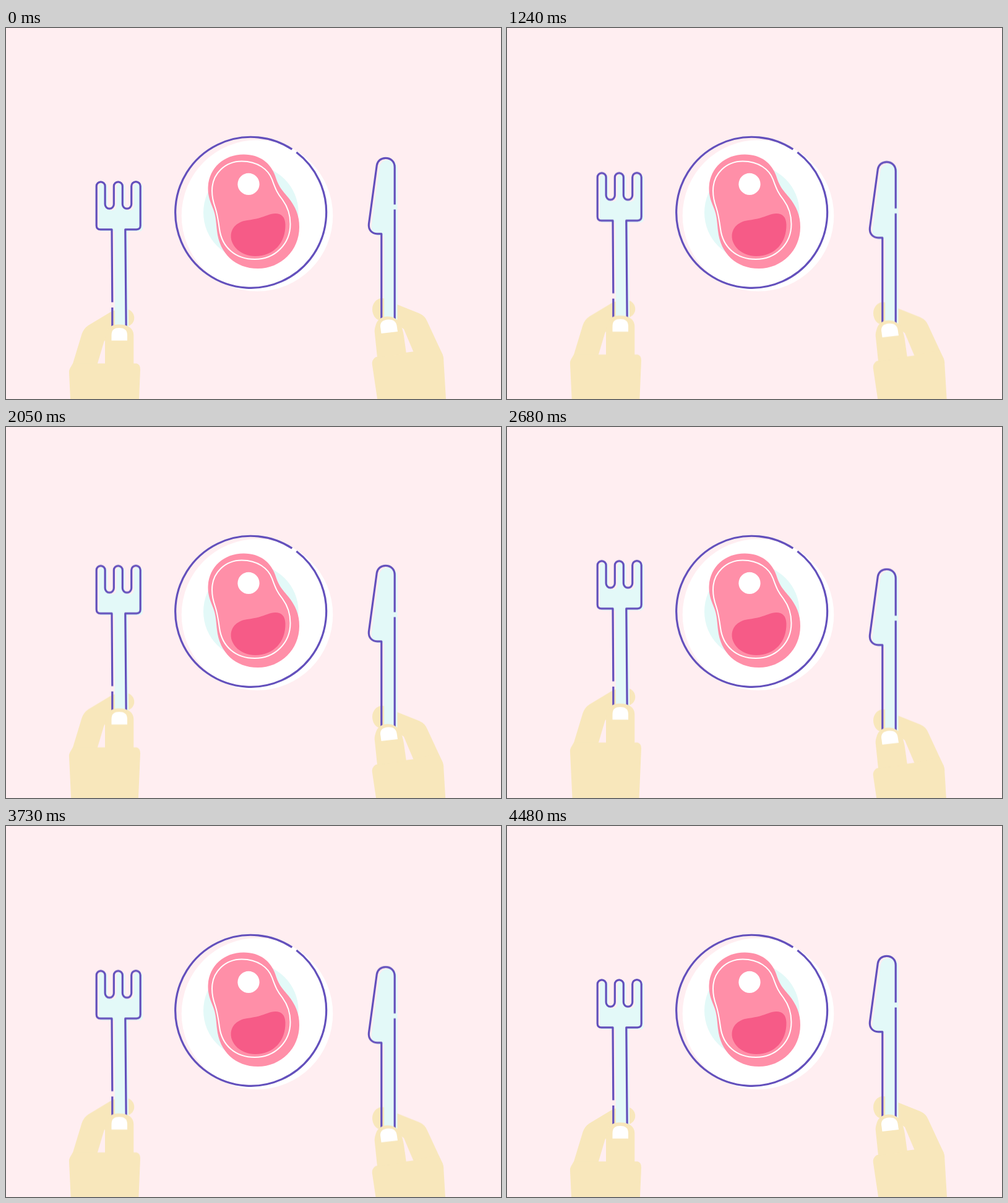
Recreate the animation shown at these times as an HTML page. Size 800 by 600 pixels, loop 4.51 s.

```html
<!DOCTYPE html>
<html lang="en">
<head>
<meta charset="utf-8">
<title>Dinner time</title>
<style>
  html, body { margin: 0; height: 100%; overflow: hidden; background: #ffeef1; }
  svg { display: block; width: 100%; height: 100%; }
  .line { fill: none; stroke: #6350bc; stroke-width: 3.2; stroke-linejoin: round; }
  .mint { fill: #e3f9f8; }
  .skin { fill: #f8e7bb; }
  .white { fill: #fff; }

  .left, .right { animation: 4510ms infinite; }
  .left { animation-name: lift; }
  .right { animation-name: lower; }

  /* 30 ms steps with a short rest at the start of each loop */
  @keyframes lift {
    0% { transform: translateY(0); animation-timing-function: step-end; }
    1.552% { transform: translateY(0); animation-timing-function: steps(90, end); }
    61.419% { transform: translateY(-33.3px); animation-timing-function: steps(57, end); }
    99.334%, 100% { transform: translateY(0); }
  }
  @keyframes lower {
    0% { transform: translateY(0); animation-timing-function: step-end; }
    12.195% { transform: translateY(0); animation-timing-function: steps(94, end); }
    74.722% { transform: translateY(26px); animation-timing-function: steps(37, end); }
    99.334%, 100% { transform: translateY(0); }
  }
</style>
</head>
<body>
<svg viewBox="0 0 800 600">
  <g id="plate">
    <circle class="white" cx="406" cy="303.5" r="122.3"/>
    <circle class="mint" cx="395.8" cy="298.5" r="76.8"/>
    <path class="line" d="M469.4 201.1A122 122 0 1 1 462.3 196.1"/>
  </g>

  <g id="steak">
    <path fill="#ff8fa8" d="M384 204.5C411 204.5 428 219 435 239C441 258 446 262 456 274C468 289 474 303 474 322C474 360 444 389 407 389C371 389 345 365 341 328C339 305 338 300 333 288C329 278 326.5 270 326.5 260C326.5 228 351 204.5 384 204.5Z"/>
    <path fill="none" stroke="#fff" stroke-width="2" d="M381 215.5C407 215.5 424 229 430 245C436 262 439 268 447 278C455 289 459.5 301 459.5 317C459.5 349 435 374 402 374C371 374 349 355 345 325C342 303 341 299 338 290C334 279 333 272 333 263C333 235 355 215.5 381 215.5Z"/>
    <circle class="white" cx="392" cy="252.4" r="17.6"/>
    <path fill="#f65b87" d="M390 311C405 309 414 306 422 303C437 297 451 299 451.5 318C452 347 433 369 403 369C379 369 363.5 352 363.5 337C363.5 322 375 313 390 311Z"/>
  </g>

  <g class="left">
    <path class="skin" d="M107 546L122.5 495Q125.5 486 133 481L172 457.5L185 454.5H193A14 14 0 0 1 193 483L170 492L158.5 507L147.5 544Z"/>
    <path class="mint" transform="translate(4 3)" d="M172 488L171 325.8H152.5Q146.2 325.8 146.2 319.5V254.8a6.95 6.95 0 0 1 13.9 0V285a7.1 7.1 0 0 0 14.2 0V254.8a7 7 0 0 1 14 0V285a7.2 7.2 0 0 0 14.4 0V254.8a7.25 7.25 0 0 1 14.5 0V319.5Q217.2 325.8 211 325.8H192.8L194.2 488Z"/>
    <path class="line" d="M171.8 443.5L171 325.8H152.5Q146.2 325.8 146.2 319.5V255.8a6.95 6.95 0 0 1 13.9 0V285a7.1 7.1 0 0 0 14.2 0V255.8a7 7 0 0 1 14 0V285a7.2 7.2 0 0 0 14.4 0V255.8a7.25 7.25 0 0 1 14.5 0V319.5Q217.2 325.8 211 325.8H192.8L194.2 488M171.8 452V488"/>
    <path class="skin" d="M102 558C101.5 552 104 550 108 542.5H211Q217.2 544 217 552L215 600L212.7 650H106.4Z"/>
    <path class="skin" d="M160 545V505C159 499 163 495 164 490C166 482 174 479.5 183 479.5C198 479.5 206.3 486 206.3 497V545Z"/>
    <path class="white" d="M170.5 505.5V497C170.5 488 175 485 183 485C191 485 196 488 196 497V505.5Z"/>
  </g>

  <g class="right">
    <path class="skin" d="M659 525L643 487L630 478L606 473C598 473 592 464 592 455C592 445 599 437 608 437L612 437.5L633 447.5L668 461.5Q677 465.5 680.5 474L706 529L698 535Z"/>
    <path class="mint" transform="translate(4.3 3)" d="M628.2 472V225C628.2 216 622 210.3 613.5 210.3C606 210.3 600.5 215 599.3 222L586.4 317C585.5 326 591 332.8 600 332.8H606.8V472Z"/>
    <path class="line" d="M628.2 285.5V225C628.2 216 622 210.3 613.5 210.3C606 210.3 600.5 215 599.3 222L586.4 317C585.5 326 591 332.8 600 332.8H606.8V475M628.2 293.5V475"/>
    <path class="skin" d="M591.8 544Q591 537 597 532.5L606 530L659 523.3L699 515L705 527Q707.5 531 707.3 538L711 600L713 640H606Z"/>
    <path class="skin" d="M600 533L596 494C595 487 597 483 598 479C601 470 609 467 616 466.5C626 466 635 472 638 480C641 487 642 492 643 498L647 527Z"/>
    <path class="white" d="M606.5 494L605 483C604.5 475 610 472 617.5 471.5C625 471 630 474 631.5 481L633 491Z"/>
  </g>
</svg>
</body>
</html>
```
